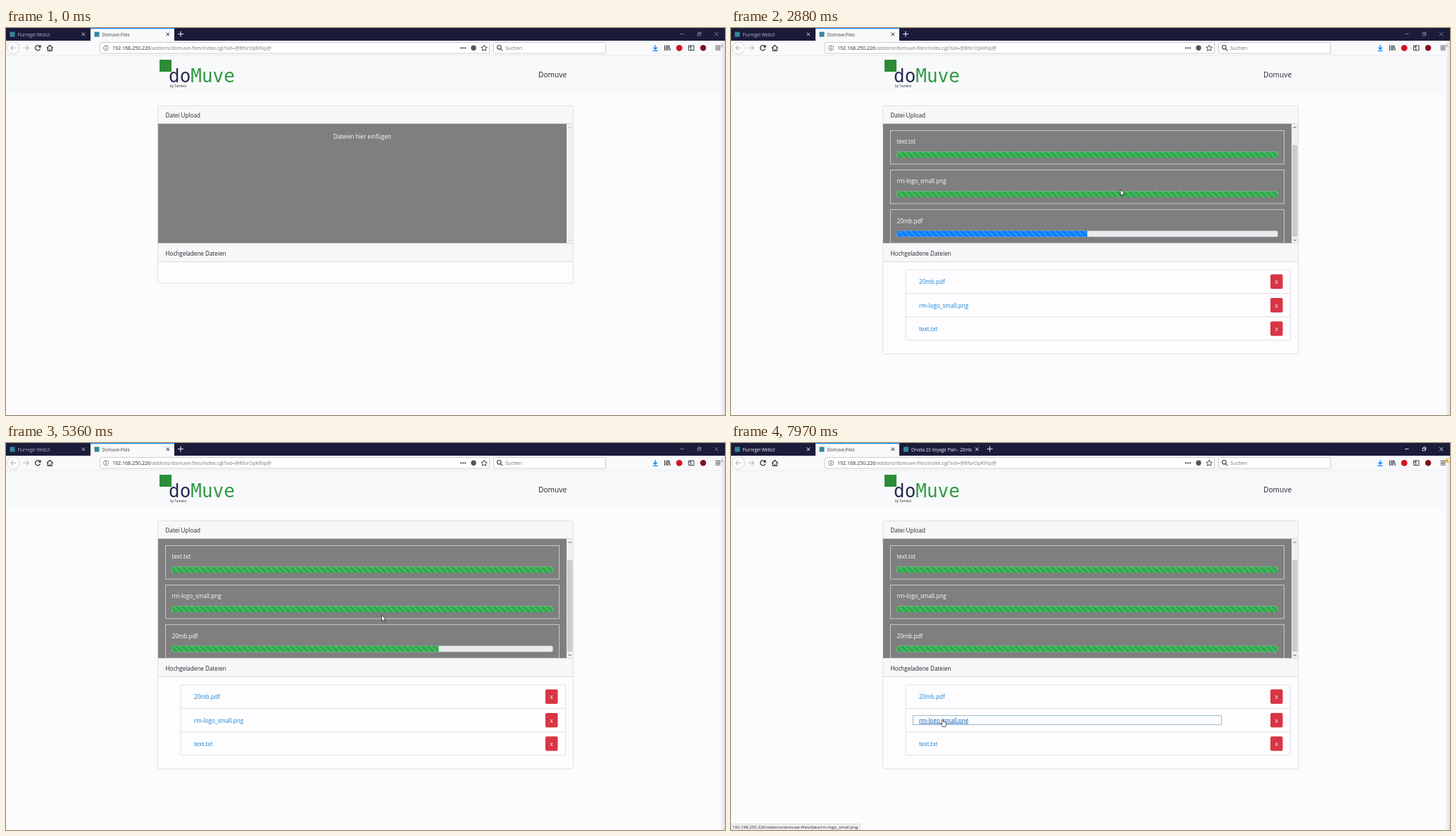
These frames come from a looping animation (1021 px wide and 549 px high, 8 s). An HTML page:

```html
<!DOCTYPE html>
<html lang="de">
<head>
<meta charset="utf-8">
<title>Datei Upload</title>
<style>
  html, body { margin: 0; width: 100%; height: 100%; overflow: hidden; background: #fcfcfe; }
  svg { display: block; width: 1021px; height: 549px; }
  text { font: 8.13px "Open Sans", "Noto Sans", sans-serif; fill: #212529; white-space: pre; }
  .tab text { font-size: 6.2px; fill: #b4b4c2; }
  .tab path { stroke: #c8c8d2; }
  .focused .tab text { fill: #f4f4f8; }
  .focused .tab path { stroke: #fff; }
  .tab rect { fill: none; }
  .tab.active .face { fill: #f9f9fa; }
  .tab.active .edge { fill: #0a84ff; }
  .tab.active text, .focused .tab.active text { fill: #3c3c46; }
  .tab.active path, .focused .tab.active path { stroke: #222; }
  .tab .icon { fill: #35879c; }
  .line { fill: none; stroke: #3b3b40; stroke-width: 1.1; }
  .row text, .white { fill: #fff; }
  .file text { fill: #1480d8; }
  .file .white { fill: #fff; }
  .file .outline { fill: none; stroke: none; }
  .file.hover .link { fill: #0056b3; text-decoration: underline; }
  .file.chosen .outline { stroke: #86a9b5; stroke-width: .8; }
  #badge { fill: #c9c9ce; }
  #windowButtons { opacity: .5; }
  .focused #badge { fill: #f5a623; }
  .focused #windowButtons { opacity: 1; }
</style>
</head>
<body>
<svg id="stage" viewBox="0 0 1021 549">
  <defs>
    <pattern id="stripes" width="8.5" height="8.5" patternUnits="userSpaceOnUse">
      <path d="M0 4.25V8.5H4.25ZM0 0H4.25L8.5 4.25V8.5Z" fill="#fff" fill-opacity=".16"/>
    </pattern>
    <clipPath id="panelClip"><rect x="216" y="136" width="580" height="169.5"/></clipPath>
    <clipPath id="titleClip"><rect x="14" y="0" width="89" height="18"/></clipPath>
    <linearGradient id="rightEdge">
      <stop offset="0" stop-color="#fcfcfe"/><stop offset="1" stop-color="#dedee3"/>
    </linearGradient>
  </defs>

  <rect width="1021" height="549" fill="#fcfcfe"/>

  <rect y="39" width="1021" height="54" fill="#f8f9fb"/>
  <rect x="218" y="45" width="17" height="17" fill="#2c8c38"/>
  <text x="231" y="77" style="font:26px 'DejaVu Sans Mono',monospace;fill:#2f9a42"><tspan fill="#2a2a55">do</tspan>Muve</text>
  <text x="233" y="84" style="font-size:4.6px">by Tumeso</text>
  <text x="756" y="70" style="font-size:10.2px">Domuve</text>

  <rect id="card" x="215.5" y="110.5" width="590" height="251.5" rx="2" fill="#fdfdff" stroke="#dcdce0" stroke-width=".9"/>
  <rect x="216" y="111" width="589" height="25" fill="#f7f7f9"/>
  <text x="226.5" y="126.6">Datei Upload</text>
  <rect x="216" y="136" width="580" height="169.5" fill="#7f7f7f"/>
  <rect x="796" y="136" width="9" height="169.5" fill="#f0f0f1"/>
  <rect id="thumb" x="797" y="145" width="7.5" height="130" fill="#cdcdcd"/>
  <path id="arrows" d="M798.6 142l2-2 2 2M798.6 300l2 2 2-2" fill="none"/>
  <g clip-path="url(#panelClip)">
    <g id="content">
      <text class="white" x="465" y="156.7">Dateien hier einfügen</text>
      <g id="rows"></g>
    </g>
  </g>
  <rect x="216" y="306" width="589" height="25.5" fill="#f7f7f9"/>
  <path d="M216 135.5H805M216 305.5H805M216 331.5H805" stroke="#dadade"/>
  <text x="226.5" y="322.7">Hochgeladene Dateien</text>
  <g id="files"></g>
  <g id="status">
    <path d="M0 540.5H183.5V549H0Z" fill="#f2f2f4" stroke="#d2d2d6" stroke-width=".8"/>
    <text x="2" y="547.3" style="font-size:6.08px">192.168.250.226/addons/domuve-files/data/<tspan id="statusFile"></tspan></text>
  </g>

  <rect width="1021" height="18" fill="#1b1b3b"/>
  <g id="tabs"></g>
  <path id="plus" d="M-4 8.5H4M0 4.5V12.5" stroke="#e8e8ee" stroke-width="1.1"/>
  <g id="windowButtons" fill="none" stroke="#e8e8ee" stroke-width=".9">
    <path d="M957 8.5H962.5M982 7.5h3.5v3.5h-3.5zM983.3 7.2V6h3.5v3.5h-1M1006 6l5.5 5.5M1011.5 6l-5.5 5.5"/>
  </g>
  <rect y="18" width="1021" height="21" fill="#f9f9fb"/>
  <path d="M0 39H1021" stroke="#e6e6ea" stroke-width=".7"/>
  <rect x="1014" y="18" width="7" height="531" fill="url(#rightEdge)"/>

  <g class="line">
    <g stroke="#b9b9bf">
      <circle cx="10.5" cy="28.3" r="8.7" fill="#fcfcfd" stroke="#cfcfd4" stroke-width=".8"/>
      <path d="M14.5 28.3H7M10 25l-3.3 3.3 3.3 3.3M24.5 28.3H32M29 25l3.3 3.3-3.3 3.3"/>
    </g>
    <path d="M48.3 26.3A3.6 3.6 0 1 0 48.6 29.6M49 24.3V27H46.2" stroke-width="1.4"/>
    <path d="M58 28.5l4.3-4 4.3 4M59.4 28V32.3H65.2V28M62.3 32V29.5" stroke-width="1.3"/>
    <rect x="133.5" y="20.5" width="553" height="15.5" rx="1" fill="#fff" stroke="#c9c9ce" stroke-width=".9"/>
    <rect x="692.5" y="20.5" width="159" height="15.5" rx="1" fill="#fff" stroke="#c9c9ce" stroke-width=".9"/>
    <circle cx="142" cy="28.3" r="3.5" stroke="#666" stroke-width=".8"/>
    <path d="M142 27.8V30.3M142 26V26.9" stroke="#555"/>
    <path d="M645 28.3h2m1 0h2m1 0h2" stroke-width="1.8"/>
    <path d="M679 24.2l1.3 2.8 3 .3-2.3 2 .7 3-2.7-1.6-2.7 1.6.7-3-2.3-2 3-.3z" stroke-width=".9"/>
    <circle cx="700.3" cy="27.3" r="2.8"/><path d="M702.3 29.4l3 3"/>
    <path d="M922 24V30M919.3 27.5l2.7 2.8 2.7-2.8M918.5 32.3H925.5" stroke="#0a84ff" stroke-width="1.3"/>
    <path d="M935.5 24.5V32M938 24.5V32M940 24.5V32M941.3 24.7l2 7.3" stroke-width="1.2"/>
    <path d="M969.3 25h7.6v6.7h-7.6zM972.5 25v6.7M970 27h2" stroke-width="1"/>
    <path d="M1007.5 25.5H1014.5M1007.5 28.3H1014.5M1007.5 31H1014.5" stroke-width="1.2"/>
  </g>
  <circle cx="664" cy="28.3" r="3.7" fill="#55555c"/>
  <circle cx="956" cy="28.3" r="4.4" fill="#d21420"/>
  <circle cx="990" cy="28.3" r="4.2" fill="#80101c"/>
  <path id="badge" d="M1016.5 21.5l3.2 5.7h-6.4z"/>
  <text x="151" y="31" style="font-size:7.05px">192.168.250.226<tspan fill="#77777c">/addons/domuve-files/index.cgi?sid=@8forOpKlNp@</tspan></text>
  <text x="709" y="31" style="font-size:7px;fill:#737378">Suchen</text>

  <g id="cursor" stroke="#111" fill="#fff" stroke-width=".7" stroke-linejoin="round">
    <path id="arrow" d="M0 0V8.6L2 6.8 3.4 9.8 4.8 9.2 3.4 6.3H6.1Z"/>
    <path id="hand" d="M-.8.8Q0-.4.8.8V4L2 3.7 2.6 4.2 3.7 4 4.2 4.7 5.2 4.8V8L4.1 11H-.2L-3 7.2Q-2.8 5.8-1.6 6.6L-.8 7.3Z"/>
  </g>
</svg>

<script>
const $ = id => document.getElementById(id);
const show = (id, on) => $(id).setAttribute('display', on ? 'inline' : 'none');
const set = (id, name, value) => $(id).setAttribute(name, value);

const LOOP = 8000, BAR = 541, BAR_EASE = 600;
const DROP = 960, SMALL_DONE = 1465, LARGE_DONE = 5213;
const SCROLL = 2348, SCROLL_TIME = 200, SCROLL_RANGE = 22.5;
const FIRST_CLICK = 6300, TAB_OPEN = 6400, SECOND_CLICK = 7900;
const uploads = ['text.txt', 'rm-logo_small.png', '20mb.pdf'];
const listed = [...uploads].reverse();
const tabTitles = ['Flurregel WebUI', 'Domuve-Files', 'Orvela 23 Voyage Plan - 20mb.pdf'];

$('rows').innerHTML = uploads.map((name, i) => `
  <g class="row" transform="translate(235.5 ${198 + i * 56.1})">
    <rect x="-9" y="-30" width="559" height="47.5" fill="none" stroke="#dcdcdc" stroke-width=".8"/>
    <text y="-11.2">${name}</text>
    <rect width="${BAR}" height="8.5" rx="2" fill="#e9ecef"/>
    <rect id="bar${i}" height="8.5" rx="1"/>
    <rect id="stripe${i}" height="8.5" rx="1" fill="url(#stripes)"/>
  </g>`).join('');

$('files').innerHTML = `
  <rect x="248" y="343" width="546.5" height="100" rx="2" fill="#fdfdff" stroke="#dcdce0" stroke-width=".9"/>
  <path d="M248 376.5H794M248 409.8H794" stroke="#dcdce0" stroke-width=".9"/>` +
  listed.map((name, i) => `
  <g class="file" id="file${i}" transform="translate(0 ${i * 33.4})">
    <rect class="outline" x="258.5" y="353.3" width="438" height="13"/>
    <text class="link" x="267" y="363.2">${name}</text>
    <rect x="766" y="349.5" width="17.5" height="20.5" rx="2" fill="#d93544"/>
    <text class="white" x="774.7" y="363.2" text-anchor="middle">x</text>
  </g>`).join('');

$('tabs').innerHTML = tabTitles.map((title, i) => `
  <g class="tab${i === 1 ? ' active' : ''}" id="tab${i}" transform="translate(${[0, 120, 239.5][i]} 0)">
    <rect class="face" width="119" height="18"/>
    <rect class="edge" width="119" height="1.2"/>
    <rect class="icon" x="5.5" y="5.5" width="7" height="7"/>
    <text x="16.5" y="11.5" clip-path="url(#titleClip)">${title}</text>
    <path d="M107.5 6.5l4.6 4.6M112.1 6.5l-4.6 4.6" stroke-width="1"/>
  </g>`).join('');

const clamp = x => Math.min(1, Math.max(0, x));
const smooth = x => x * x * (3 - 2 * x);

// CSS "ease": cubic-bezier(.25, .1, .25, 1)
function ease(x) {
  let low = 0, high = 1;
  for (let i = 0; i < 20; i++) {
    const s = (low + high) / 2;
    if (.75 * s * (1 - s) + s ** 3 < x) low = s; else high = s;
  }
  return .3 * low * (1 - low) ** 2 + 3 * low * low * (1 - low) + low ** 3;
}

// keys: [time, x, y]
function track(keys, t) {
  const next = keys.findIndex(key => key[0] > t);
  if (next === 0) return keys[0].slice(1);
  if (next < 0) return keys[keys.length - 1].slice(1);
  const a = keys[next - 1], b = keys[next];
  const k = (t - a[0]) / (b[0] - a[0]);
  return [a[1] + (b[1] - a[1]) * k, a[2] + (b[2] - a[2]) * k];
}

const pointer = [[5265, 553, 229], [5360, 534, 244], [5850, 284.5, 361.5],
  [7200, 284.5, 361.5], [7700, 300.5, 391.5]];

// A bar eases to one half while sending and to its full width once done.
function drawBar(i, t, done) {
  const eased = since => ease(clamp((t - since) / BAR_EASE));
  const half = eased(DROP) / 2;
  const width = BAR * (half + (1 - half) * eased(done));
  set('bar' + i, 'width', width);
  set('stripe' + i, 'width', width);
  set('bar' + i, 'fill', t < done ? '#007bff' : '#28a745');
}

function draw(t) {
  const dropped = t >= DROP, filled = t >= SMALL_DONE;
  const focused = t >= FIRST_CLICK, opened = t >= TAB_OPEN;

  show('rows', dropped);
  show('thumb', dropped);
  set('arrows', 'stroke', dropped ? '#505050' : '#bdbdc1');
  [SMALL_DONE, SMALL_DONE, LARGE_DONE].forEach((done, i) => drawBar(i, t, done));

  const scroll = smooth(clamp((t - SCROLL) / SCROLL_TIME));
  set('content', 'transform', `translate(0 ${-scroll * SCROLL_RANGE})`);
  set('thumb', 'y', 145 + scroll * 21);

  show('files', filled);
  set('card', 'height', filled ? 352 : 251.5);

  const [x, y] = track(pointer, t);
  const hover = listed.findIndex((name, i) =>
    x > 267 && x < 338 && Math.abs(y - 361 - i * 33.4) < 8);
  const chosen = t >= SECOND_CLICK ? 1 : focused ? 0 : -1;
  listed.forEach((name, i) => {
    $('file' + i).classList.toggle('hover', i === hover);
    $('file' + i).classList.toggle('chosen', i === chosen);
  });
  show('status', focused && hover >= 0);
  $('statusFile').textContent = listed[hover] || '';

  show('cursor', dropped);
  set('cursor', 'transform', `translate(${x} ${y})`);
  show('hand', hover >= 0);
  show('arrow', hover < 0);

  show('tab2', opened);
  set('plus', 'transform', `translate(${opened ? 367.5 : 248} 0)`);
  $('stage').classList.toggle('focused', focused);
}

const start = performance.now();
function tick() {
  draw((performance.now() - start) % LOOP);
  requestAnimationFrame(tick);
}
tick();
</script>
</body>
</html>
```
